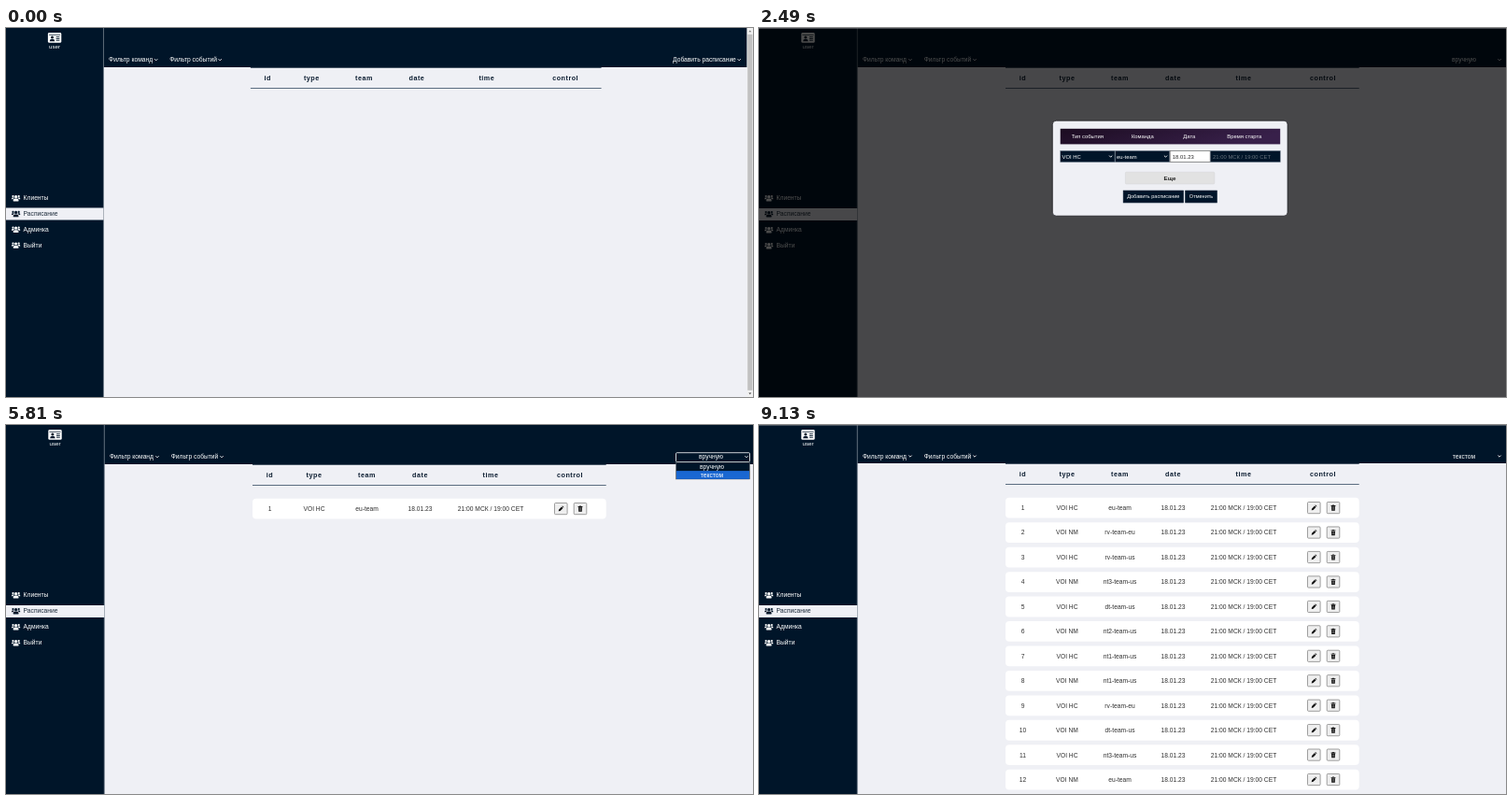
These frames come from a looping animation (800x395 px, 9960 ms). An HTML page:

```html
<!DOCTYPE html>
<html lang="ru">
<head>
<meta charset="utf-8">
<title>Расписание</title>
<style>
html, body { margin: 0; width: 100%; height: 100%; overflow: hidden; background: #eff0f5; }
svg { display: block; width: 100vw; height: 100vh; }
text { white-space: pre; }
</style>
</head>
<body>
<svg id="stage" viewBox="0 0 800 395" preserveAspectRatio="none"></svg>
<script>
const STEP = 830;
const NAVY = '#001529', PAPER = '#eff0f5', WHITE = '#fff';
const SANS = "'Liberation Sans', Arial, sans-serif";
const MONO = "'DejaVu Sans Mono', 'Liberation Mono', monospace";
const TIME = '21:00 МСК / 19:00 CET', DATE = '18.01.23', ADD = 'Добавить расписание';
const TEAMS = ['eu-team', 'rv-team-eu', 'rv-team-us', 'nt3-team-us', 'dt-team-us', 'nt2-team-us',
  'nt1-team-us', 'nt1-team-us', 'rv-team-eu', 'dt-team-us', 'nt3-team-us', 'eu-team'];
const COLS = { id: 282.5, type: 330, team: 386.5, date: 443.5, time: 519, control: 604 };

// One entry per step; form and text describe the two dialogs.
const STATES = [
  { pick: ADD, scrollbar: true },
  { pick: ADD, focus: true, list: 0 },
  { pick: 'вручную', focus: true, form: {}, edge: true },
  { pick: 'вручную', form: { date: true, active: 'date' } },
  { pick: 'вручную', form: { date: true, time: true, active: 'time' } },
  { pick: 'вручную', form: { date: true, time: true, active: 'time', hover: true, dx: .7, dy: .6 } },
  { pick: 'вручную', rows: 1, hoverRow: true },
  { pick: 'вручную', focus: true, rows: 1, list: 1 },
  { pick: 'текстом', focus: true, rows: 1, text: {}, edge: true },
  { pick: 'текстом', rows: 1, text: { filled: true } },
  { pick: 'текстом', rows: 1, text: { filled: true, hover: true, dy: .4 } },
  { pick: 'текстом', rows: 12, dy: -1 }
];

const rect = (x, y, w, h, fill, more = '') =>
  `<rect x="${x}" y="${y}" width="${w}" height="${h}" fill="${fill}" ${more}/>`;
const path = (d, fill, more = '') => `<path d="${d}" fill="${fill}" ${more}/>`;
const stroke = (color, w = .8) => `stroke="${color}" stroke-width="${w}"`;
const group = (x, y, body) => `<g transform="translate(${x} ${y})">${body}</g>`;

// y is the vertical middle of the line
function label(s, x, y, o = {}) {
  const { size = 6.7, fill = WHITE, anchor = 'start', bold, gap = 0, font = SANS } = o;
  return `<text x="${x}" y="${y + size * .35}" font-family="${font}" font-size="${size}" fill="${fill}"` +
    ` text-anchor="${anchor}" font-weight="${bold ? 700 : 400}" letter-spacing="${gap}">${s}</text>`;
}
const mid = (s, x, y, o) => label(s, x, y, { anchor: 'middle', ...o });
const heading = (s, x, y) => mid(s, x, y, { size: 7.2, bold: true, gap: .5, fill: '#0b1c30' });
const chevron = (x, y, color = WHITE) =>
  path(`M${x - 1.6} ${y - .8}l1.6 1.6 1.6-1.6`, 'none', stroke(color, .9));

function people(x, y, fill) {
  const head = (cx, cy, r) => `<circle cx="${cx}" cy="${cy}" r="${r}"/>`;
  return group(x, y, `<g fill="${fill}">${head(0, -1.4, 1.6)}${head(-3.1, -1.9, 1.1)}${head(3.1, -1.9, 1.1)}
    <path d="M-2.8 3.4v-1.2q0-1.6 1.6-1.6h2.4q1.6 0 1.6 1.6v1.2z"/>
    <path d="M-4.6 1.2v-.7q0-1.1 1.1-1.1h1.1q.6 0 .9.4-1.3.5-1.5 1.4zM4.6 1.2v-.7q0-1.1-1.1-1.1h-1.1q-.6 0-.9.4 1.3.5 1.5 1.4z"/></g>`);
}

function card(x) {
  return group(x, 5, rect(-7.2, 0, 14.4, 10.8, WHITE, 'rx="1.4"') +
    rect(-6, 1.9, 12, .7, NAVY) +
    `<circle cx="-2.6" cy="5" r="1.5" fill="${NAVY}"/>` +
    path('M-5.3 9.2q0-2.2 1.7-2.2h2q1.7 0 1.7 2.2z', NAVY) +
    [4.2, 6, 7.8].map(y => rect(1.5, y, 3.8, .9, NAVY)).join(''));
}

function sidebar(k) {
  const items = ['Клиенты', 'Расписание', 'Админка', 'Выйти'];
  const w = 105.3 * k;
  return rect(0, 0, w, 395, NAVY) + rect(w - .5, 0, .7, 395, '#6b7885') +
    card(52.5 * k) + mid('user', 52.5 * k, 20.3, { size: 6.2 }) +
    rect(0, k < 1 ? 192.5 : 193, w, 13, PAPER) +
    items.map((s, i) => {
      const y = 182 + i * (k < 1 ? 16.8 : 17), fill = i === 1 ? '#1d2b3b' : WHITE;
      return people(10.6, y, i === 1 ? NAVY : WHITE) + label(s, 18.6, y, { fill });
    }).join('');
}

function topbar(s, k, dy) {
  const y = 34 + dy * .6, x = 755 * k;
  let out = rect(105.3 * k, 0, 694.7 * k, 42 + dy, NAVY) +
    label('Фильтр команд', 111 * k, y) + chevron(162 * k, y) +
    label('Фильтр событий', 176.7 * k, y) + chevron(231 * k, y);
  if (s.focus) out += rect(717.5, 29.7, 79, 9.8, NAVY, `rx="1" ${stroke(WHITE)}`);
  out += s.pick === ADD ? mid(ADD, 754 * k, y) : mid(s.pick, x, y);
  return out + chevron((s.pick === ADD ? 791.5 : 793) * k, y);
}

function optionList(chosen) {
  return rect(717.5, 40, 79, 18, NAVY, stroke('#767676', .5)) +
    ['вручную', 'текстом'].map((s, i) =>
      (i === chosen ? rect(718, 40.3 + i * 8.8, 78, 8.8, '#1967d2') : '') +
      mid(s, 756, 44.7 + i * 8.8)).join('');
}

function tools(y) {
  const box = x => rect(x - 6.8, y - 6.2, 13.6, 12.2, '#efefef', `rx="1" ${stroke('#777', .7)}`);
  return box(594.3) + box(615) +
    group(594.3, y, path('M-2.6 2.6l.4-1.9 2.9-2.9 1.5 1.5-2.9 2.9zM1.1-2.6l.6-.5 1.5 1.5-.6.5z', '#111')) +
    group(615, y, path('M-2.4-2.7h1.4l.4-.5h1.2l.4.5h1.4v.9h-4.8zM-2.1-1.4h4.2l-.3 4.4h-3.6z', '#111') +
      path('M-.8-.6v2.7M.8-.6v2.7', 'none', stroke('#efefef', .4)));
}

function tableRow(i, dy, hover) {
  const y = 89.7 + dy + i * 26.45, fill = hover ? WHITE : '#303030';
  const cells = [i + 1, i % 2 ? 'VOI NM' : 'VOI HC', TEAMS[i], DATE, TIME];
  return rect(264, y - 10.9, 378.7, 21.8, hover ? 'url(#plum)' : WHITE,
    `rx="4" ${hover ? stroke('#b9a3c4') : ''}`) +
    Object.values(COLS).slice(0, 5).map((x, c) => mid(cells[c], x, y, { fill, size: 6.7 })).join('') +
    tools(y);
}

function table(s, k, dy) {
  let out = Object.entries(COLS).map(([name, x]) => heading(name, x * k, 53.3 + dy)).join('') +
    rect(264 * k, 41.9 + dy, 378.7 * k, .8, NAVY) + rect(264 * k, 64.1 + dy, 378.7 * k, .9, '#4b5f73');
  for (let i = 0; i < (s.rows || 0); i++) out += tableRow(i, dy, s.hoverRow);
  return out;
}

function scrollbar() {
  return rect(793.6, 0, 6.4, 395, '#f1f1f1') + rect(794.2, 6.8, 5.2, 381, '#c1c1c1') +
    path('M795.3 4.3l1.5-1.8 1.5 1.8z', '#777') + path('M795.3 390.5l1.5 1.8 1.5-1.8z', '#444');
}

function button(s, x, y, w, hover) {
  return rect(x, y, w, 12.8, hover ? PAPER : NAVY, stroke(NAVY, .7)) +
    mid(s, x + w / 2, y + 6.4, { size: 5.55, fill: hover ? NAVY : WHITE });
}
const actions = (y, hover) => button(ADD, 390.2, y, 64.2, hover) + button('Отменить', 456.7, y, 33.6);

function panel(h, o, body) {
  return rect(0, 0, 800, 395, '#000', 'opacity=".7"') +
    group(o.dx || 0, o.dy || 0, rect(314.3, 99.2, 251.8, h, PAPER, `rx="4" ${stroke('#0c0c10', .7)}`) + body);
}

function formDialog(f) {
  const size = 5.9;
  const field = (key, x, w, s, filled) => {
    const on = f.active === key;
    const fill = on ? '#222' : filled ? WHITE : '#68727d';
    return rect(x, 131.4, w, 12.2, on ? WHITE : NAVY, stroke(on ? '#777' : '#8b96a2', on ? .8 : .4)) +
      label(s, x + 2.6, 137.6, { size, fill });
  };
  const select = (s, x, w) => rect(x, 131.4, w, 12.2, NAVY, stroke('#8b96a2', .4)) +
    label(s, x + 1.8, 137.6, { size }) + chevron(x + w - 4.3, 137.4);
  const heads = { 'Тип события': 351.8, 'Команда': 410.8, 'Дата': 460.8, 'Время старта': 519.8 };
  return panel(102, f,
    rect(322.7, 107.8, 235.5, 16.6, 'url(#plum)') +
    Object.entries(heads).map(([s, x]) => mid(s, x, 116, { size: 5.85 })).join('') +
    select('VOI HC', 322.7, 58.3) + select('eu-team', 381.3, 58.5) +
    field('date', 440.2, 43, DATE, f.date) + field('time', 483.4, 75, TIME, f.time) +
    rect(392.4, 154.2, 95.4, 12.8, '#e2e2e2', `rx="1" ${stroke('#d2d2d4', .5)}`) +
    mid('Еще', 440, 160.6, { size: 6.2, bold: true, fill: '#222' }) +
    actions(174.1, f.hover));
}

function textDialog(o) {
  const mono = { font: MONO, size: 6.53 };
  const stop = ' '.repeat(8), tail = DATE + stop + '21:00 МСК /';
  const pasted = ['VOI HC  NT1-TEAM-US     ' + tail, '19:00 CET', 'VOI NM  RV-TEAM-US      ' + tail, '19:00 CET',
    'VOI NM  EU-TEAM ' + tail + ' 19:00', 'CET', 'VOI NM  RV-TEAM-US      ' + tail, '19:00 CET'];
  const hints = ['1 Вариант1 Команда1 18.01.23 19:00 МСК / 17:00 CET',
    '2 Вариант2 Команда2 18.01.23 21:00 МСК / 19:00 CET', '......'];
  const bar = rect(549.8, 121.7, 7.6, 65.4, '#f1f1f1') + rect(550.9, 171.5, 5.4, 7.8, '#c1c1c1') +
    path('M552 126.3l1.6-1.9 1.6 1.9z', '#555') + path('M552 182.8l1.6 1.9 1.6-1.9z', '#777');
  const body = o.filled
    ? pasted.map((s, i) => label(s, 334, 124.2 + i * 8.42, { ...mono, fill: '#222' })).join('') + bar
    : hints.map((s, i) => mid(s, 440, 146 + i * 8.5, { ...mono, fill: '#757575' })).join('');
  return panel(132.4, o,
    heading('Расписание', 440, 111.8) +
    rect(322.6, 121.3, 235.2, 66, WHITE) + `<g clip-path="url(#area)">${body}</g>` +
    rect(322.6, 121.3, 235.2, 66, 'none', stroke('#777', .8)) +
    mid('!Обратите внимание: ввод допускается только английской раскладкой', 440, 195.2, { size: 5.88, fill: '#7d6470' }) +
    actions(204.7, o.hover));
}

const DEFS = `<defs>
  <linearGradient id="plum" x1="0" y1="0" x2="1" y2=".25">
    <stop offset="0" stop-color="#1c0c21"/><stop offset="1" stop-color="#38204a"/>
  </linearGradient>
  <clipPath id="area"><rect x="322.6" y="121.3" width="235.2" height="66"/></clipPath>
</defs>`;

function render(s) {
  const k = s.scrollbar ? .992 : 1, dy = s.dy || 0;
  return DEFS + rect(0, 0, 800, 395, PAPER) + table(s, k, dy) + topbar(s, k, dy) + sidebar(k) +
    (s.scrollbar ? scrollbar() : '') +
    (s.list !== undefined ? optionList(s.list) : '') +
    (s.form ? formDialog(s.form) : '') + (s.text ? textDialog(s.text) : '') +
    (s.form || s.text || s.rows > 1 ? rect(0, 0, 800, .5, '#8a8a90') : '') +
    (s.edge ? rect(0, 394.2, 800, .8, '#38243f') : '');
}

const stage = document.getElementById('stage');
const start = performance.now();
let shown = -1;
function tick() {
  const i = Math.floor((performance.now() - start) / STEP) % STATES.length;
  if (i !== shown) stage.innerHTML = render(STATES[shown = i]);
  requestAnimationFrame(tick);
}
tick();
</script>
</body>
</html>
```
